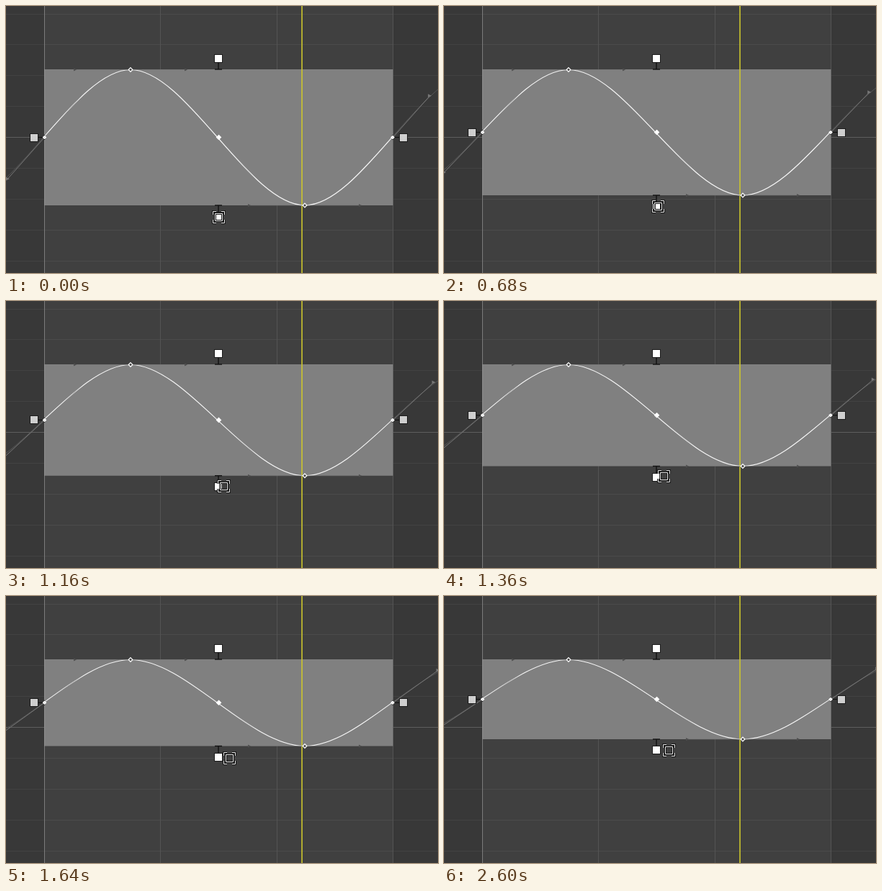
Write an HTML page with a canvas that moves like this. It is 600x371 px and loops after 2.84 s.

```html
<!DOCTYPE html>
<html lang="en">
<head>
<meta charset="utf-8">
<title>Scaling a curve</title>
<style>
  html, body { margin: 0; width: 100%; height: 100%; overflow: hidden; background: #383838; }
  canvas { display: block; }
</style>
</head>
<body>
<canvas id="stage" width="600" height="371"></canvas>
<script>
const ctx = document.getElementById('stage').getContext('2d');
const W = 600, H = 371, LOOP = 2840, STEP = 40;
const LEFT = 53.5, RIGHT = 537.5, TOP = 88, CENTER = 295;
const PEAK = 173, HALF = 242, REACH = 77;

// time, bottom edge, cursor x, cursor y
const keys = [
  [0, 277, 295, 293], [400, 277, 295, 293], [680, 263, 297.5, 278.5],
  [920, 257, 298.5, 271.5], [960, 256, 299, 271], [1360, 229.5, 305, 243],
  [1520, 215.5, 308.5, 231], [1640, 208.5, 310.5, 225], [1920, 202.5, 312.5, 218],
  [2040, 200.5, 312.5, 216.5], [2080, 200.5, 312.5, 216.5],
  [2160, 199, 312.5, 214.5], [LOOP, 199, 312.5, 214.5]
];

function poseAt(t) {
  const i = keys.findIndex(k => k[0] > t);
  const a = keys[i - 1], b = keys[i];
  const p = (t - a[0]) / (b[0] - a[0]);
  return a.map((v, n) => v + (b[n] - v) * p).slice(1);
}

function fill(x, y, w, h, color) {
  ctx.fillStyle = color;
  ctx.fillRect(x, y, w, h);
}

function line(x1, y1, x2, y2, color, width = 1) {
  ctx.strokeStyle = color;
  ctx.lineWidth = width;
  ctx.beginPath();
  ctx.moveTo(x1, y1);
  ctx.lineTo(x2, y2);
  ctx.stroke();
}

function clipped(x, w, draw) {
  ctx.save();
  ctx.beginPath();
  ctx.rect(x, 0, w, H);
  ctx.clip();
  draw();
  ctx.restore();
}

function grid() {
  fill(0, 0, W, H, '#383838');
  fill(53, 0, 484, H, '#404040');
  for (let i = 0; i < 9; i++) {
    const y = Math.floor(11 + i * 42.9);
    const axis = i === 4;
    fill(0, y, W, 1, axis ? '#5e5e5e' : '#424242');
    fill(53, y, 484, 1, axis ? '#666' : '#4b4b4b');
  }
  [214, 376, 537].forEach(x => fill(x, 0, 1, H, '#545454'));
  fill(53, 0, 1, H, '#7c7c7c');
}

function wave(bottom, color, width) {
  ctx.strokeStyle = color;
  ctx.lineWidth = width;
  ctx.beginPath();
  ctx.moveTo(PEAK - HALF, bottom);
  for (let i = 0; i < 3; i++) {
    const x = PEAK + (i - 1) * HALF;
    const from = i % 2 ? TOP + .5 : bottom;
    const to = i % 2 ? bottom : TOP + .5;
    ctx.bezierCurveTo(x + REACH, from, x + HALF - REACH, to, x + HALF, to);
  }
  ctx.stroke();
}

function diamond(x, y, r, inside) {
  ctx.beginPath();
  ctx.moveTo(x, y - r);
  ctx.lineTo(x + r, y);
  ctx.lineTo(x, y + r);
  ctx.lineTo(x - r, y);
  ctx.closePath();
  ctx.strokeStyle = '#fff';
  ctx.lineWidth = 1.2;
  ctx.fillStyle = inside;
  ctx.fill();
  ctx.stroke();
}

function arrow(x, y, color, r = 2) {
  ctx.fillStyle = color;
  ctx.beginPath();
  ctx.moveTo(x - r, y - r);
  ctx.lineTo(x + r, y);
  ctx.lineTo(x - r, y + r);
  ctx.fill();
}

function knob(x, y, color) {
  x = Math.round(x);
  y = Math.round(y);
  fill(x - 6, y - 6, 12, 12, '#1c1c1c');
  fill(x - 5, y - 5, 10, 10, color);
}

function verticalGrip(y, dir) {
  line(CENTER, y, CENTER, y + dir * 10, '#111', 1.4);
  line(CENTER - 5, y, CENTER + 5, y, '#111', 1.4);
  knob(CENTER, y + dir * 15.2, '#fff');
}

function sideGrip(x, y, dir) {
  line(x, y, x + dir * 10, y, '#111', 1.2);
  line(x, y - 3.5, x, y + 3.5, '#111', 1.2);
  knob(x + dir * 15, y, '#cfcfcf');
  diamond(x, y, 2, '#ddd');
}

function cursor(x, y) {
  x = Math.floor(x) + .5;
  y = Math.floor(y) + .5;
  const path = new Path2D();
  path.rect(x - 5, y - 5, 10, 10);
  for (const sx of [-1, 1]) for (const sy of [-1, 1]) {
    path.moveTo(x + sx * 3.5, y + sy * 8);
    path.lineTo(x + sx * 8, y + sy * 8);
    path.lineTo(x + sx * 8, y + sy * 3.5);
  }
  for (const [color, width] of [['#1a1a1a', 3], ['#e4e4e4', 1]]) {
    ctx.strokeStyle = color;
    ctx.lineWidth = width;
    ctx.stroke(path);
  }
}

function draw(t) {
  const [bottom, cx, cy] = poseAt(t);
  const mid = (TOP + bottom) / 2;
  const angle = Math.atan((bottom - TOP) * .00597);
  const dx = REACH * Math.cos(angle), dy = REACH * Math.sin(angle);

  grid();
  fill(53, TOP, 484.5, bottom - TOP, '#808080');
  fill(53, TOP, 1, bottom - TOP, '#909090');

  clipped(0, 53, () => wave(bottom, '#565656', 1));
  clipped(538, 62, () => wave(bottom, '#565656', 1));
  fill(410.25, 0, 1.6, H, '#cbc52c');
  clipped(LEFT, RIGHT - LEFT, () => wave(bottom, '#f4f4f4', 1.2));

  // tangent handles
  const tangent = 'rgba(128,128,128,.55)';
  line(LEFT, mid, LEFT + dx, mid - dy, tangent);
  line(RIGHT, mid, RIGHT - dx, mid + dy, tangent);
  line(CENTER - dx, mid - dy, CENTER + dx, mid + dy, 'rgba(128,128,128,.3)');
  line(LEFT, mid, LEFT - dx, mid + dy, '#777');
  line(RIGHT, mid, RIGHT + dx, mid - dy, '#777');
  arrow(LEFT - dx, mid + dy, '#777', 2.5);
  arrow(RIGHT + dx, mid - dy, '#777', 2.5);
  for (const [x, y] of [[PEAK, TOP + .5], [PEAK + HALF, bottom]]) {
    line(x - REACH, y, x + REACH, y, 'rgba(112,112,112,.6)');
    arrow(x - REACH, y, '#505050');
    arrow(x + REACH, y, '#505050');
    diamond(x, y, 2.8, '#484848');
  }

  diamond(CENTER + .5, mid, 3, '#fff');
  sideGrip(LEFT, mid, -1);
  sideGrip(RIGHT - .5, mid, 1);
  verticalGrip(TOP, -1);
  verticalGrip(bottom, 1);
  cursor(cx, cy);
}

const start = performance.now();
function tick() {
  const t = (performance.now() - start) % LOOP;
  draw(Math.floor(t / STEP) * STEP);
  requestAnimationFrame(tick);
}
tick();
</script>
</body>
</html>
```
